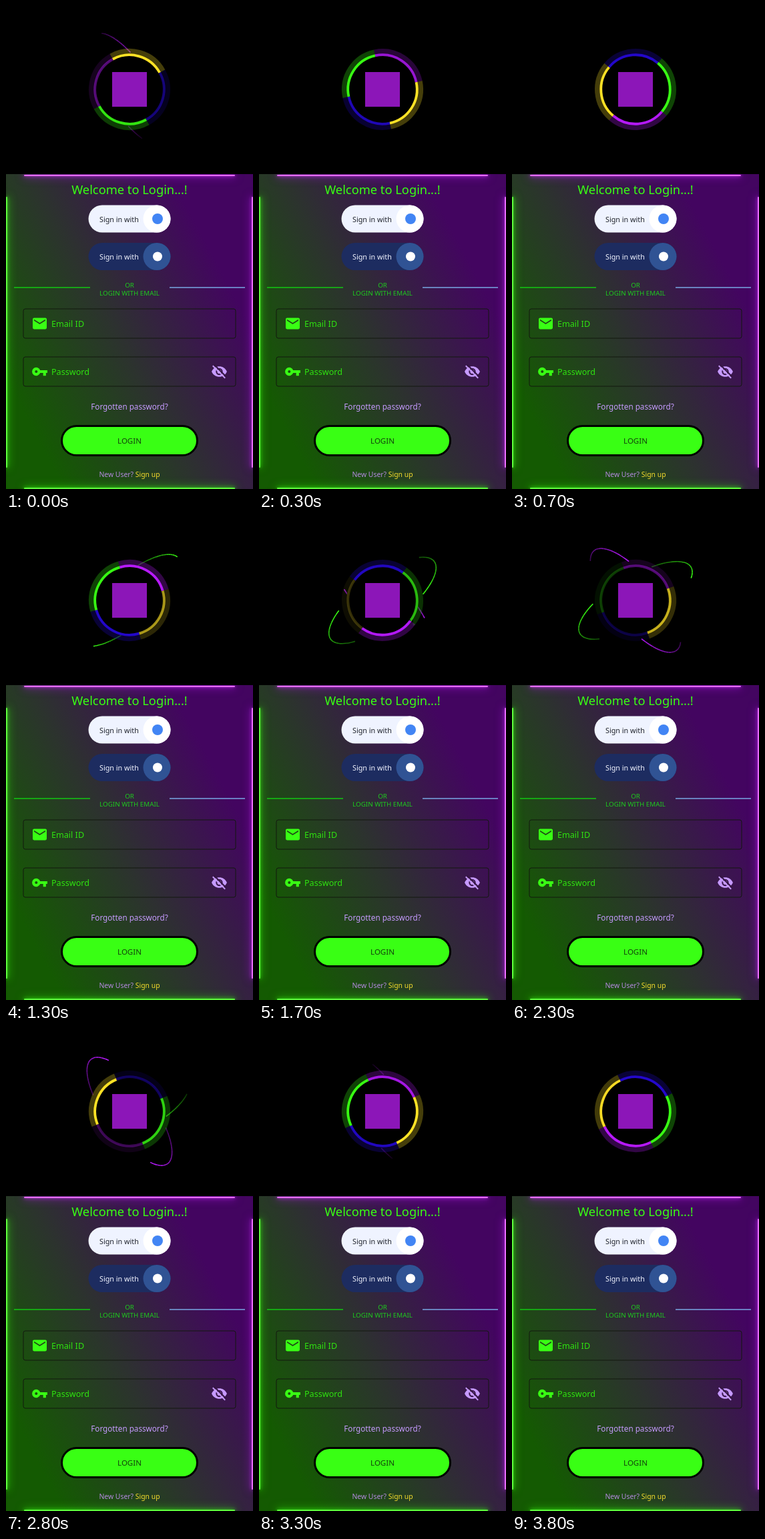
An HTML page with a canvas for the animation above (3.9 s loop, 370 by 724 pixels).

```html
<!DOCTYPE html>
<html lang="en">
<head>
<meta charset="utf-8">
<title>Login</title>
<style>
  html, body { margin: 0; width: 100%; height: 100%; overflow: hidden; background: #000; }
  #stage { position: relative; width: 370px; height: 724px; overflow: hidden; }
  canvas, svg { position: absolute; left: 0; top: 0; }
  .panel {
    position: absolute; left: 0; top: 252px; width: 370px; height: 472px; overflow: hidden;
    background: linear-gradient(62deg, #145a02 14%, #2c332e 46%, #430560 80%);
  }
  .edge { position: absolute; border-radius: 2px; }
  .h { left: 27px; width: 316px; height: 2px; }
  .v { top: 34px; width: 2px; height: 406px; }
  .green { background: #5dff3c; box-shadow: 0 0 5px #39ff14, 0 0 13px 1px #39ff14aa; }
  .pink { background: #e66cff; box-shadow: 0 0 5px #d02cff, 0 0 13px 1px #b81affaa; }
  text { font-family: "Noto Sans", "Open Sans", sans-serif; }
  .mid { text-anchor: middle; }
  .field { fill: none; stroke: #12180f; }
</style>
</head>
<body>
<div id="stage">
  <canvas id="emblem" width="370" height="252"></canvas>
  <div class="panel">
    <div class="edge h pink" style="top:1px"></div>
    <div class="edge h green" style="bottom:0"></div>
    <div class="edge v green" style="left:0"></div>
    <div class="edge v pink" style="right:0"></div>
  </div>
  <svg width="370" height="724" viewBox="0 0 370 724">
    <text class="mid" x="185" y="282" font-size="18.3" fill="#39ff14">Welcome to Login...!</text>

    <rect x="123.5" y="298.5" width="123" height="41" rx="20.5" fill="#eff3ff"/>
    <circle cx="226" cy="319" r="20.5" fill="#fff"/>
    <circle cx="227" cy="319" r="8" fill="#4285f4"/>
    <text x="140" y="324" font-size="10.8" fill="#20242c">Sign in with</text>

    <rect x="123.5" y="355" width="123" height="41" rx="20.5" fill="#1d2c60"/>
    <circle cx="226" cy="375.5" r="20.5" fill="#305394"/>
    <circle cx="227" cy="375.5" r="7" fill="#fff"/>
    <text x="140" y="380" font-size="10.8" fill="#f2f5ff">Sign in with</text>

    <path d="M12 422H126" stroke="#12c812" stroke-width="1.6"/>
    <path d="M245 422H358" stroke="#78a8e4" stroke-width="1.6"/>
    <g class="mid" font-size="9.8" fill="#1ecb1e">
      <text x="185" y="421.5">OR</text>
      <text x="185" y="433.5">LOGIN WITH EMAIL</text>
    </g>

    <rect class="field" x="26" y="454" width="318" height="44" rx="3"/>
    <rect class="field" x="26" y="526" width="318" height="44" rx="3"/>
    <g fill="#39ff14">
      <path transform="translate(37.9 463.4) scale(1.05)"
        d="M20 4H4a2 2 0 0 0-2 2v12a2 2 0 0 0 2 2h16a2 2 0 0 0 2-2V6a2 2 0 0 0-2-2zm0 4l-8 5-8-5V6l8 5 8-5z"/>
      <path transform="translate(38 535.5) scale(1.04)" fill-rule="evenodd"
        d="M12.65 10A6 6 0 1 0 12.65 14H17v4h4v-4h2v-4zM7 14a2 2 0 1 1 0-4 2 2 0 0 1 0 4z"/>
    </g>
    <g font-size="12.6" fill="#2fe310">
      <text x="68" y="481">Email ID</text>
      <text x="68" y="553">Password</text>
    </g>
    <g transform="translate(307 535.5) scale(1.04)">
      <path fill="#c69aff" fill-rule="evenodd"
        d="M1 12C5 2 19 2 23 12C19 22 5 22 1 12zM12 7a5 5 0 1 0 0 10 5 5 0 0 0 0-10z"/>
      <circle cx="12" cy="12" r="3" fill="#c69aff"/>
      <path d="M4.5 2L22 19.5" stroke="#351643" stroke-width="2"/>
      <path d="M2.6 3.6L20.4 21.4" stroke="#c69aff" stroke-width="1.8"/>
    </g>

    <text class="mid" x="185" y="605" font-size="11.7" fill="#c69aff">Forgotten password?</text>
    <rect x="83.5" y="629.5" width="203" height="44" rx="22" fill="#39ff14" stroke="#000" stroke-width="3"/>
    <text class="mid" x="185" y="656.3" font-size="11.5" fill="#12400c">LOGIN</text>
    <text class="mid" x="185" y="705.5" font-size="10.4" fill="#b48ae0">New User? <tspan fill="#f5dc2c">Sign up</tspan></text>
  </svg>
</div>
<script>
const LOOP = 3900, STEP = 100, SWEEP = 900, PULSE = 2900;
const CX = 185, CY = 125, RAD = Math.PI / 180;
const GREEN = '#39ff14', PURPLE = '#b81aff';
const ctx = document.getElementById('emblem').getContext('2d');

// Ring quarters, each with the time at which it is darkest
const quarters = [
  { color: '#ffe326', dip: 1750 },
  { color: '#2408cc', dip: 2500 },
  { color: GREEN, dip: 2200 },
  { color: PURPLE, dip: 2600 }
];

// Two slowly turning orbits; near and far are the sweep starts on either end
const orbits = [
  { color: GREEN, tilt: -54, turn: .01, near: [1120, 2000], far: [1200, 1760] },
  { color: PURPLE, tilt: 33, turn: .0075, near: [-850, 1660, 2440], far: [-775, 1680, 2440] }
];

function brightness(t, dip) {
  const away = (t - dip) - PULSE * Math.round((t - dip) / PULSE);
  return 1 - .8 * Math.exp(-((away / 500) ** 2));
}

// The head eases out while the tail eases in, so the streak stretches and shrinks
function drawSweep(orbit, side, start, t) {
  const p = (t - start) / SWEEP;
  if (p <= 0 || p >= 1) return;
  const angle = q => side - 66 + 128 * q;
  const tail = angle(p ** 3), head = angle(1 - (1 - p) ** 3);
  const tilt = (orbit.tilt + orbit.turn * (start < 0 ? t + 3300 : t)) * RAD;
  const n = 16, d = (head - tail) / n;
  ctx.strokeStyle = orbit.color;
  ctx.lineWidth = 1.6;
  for (let i = 0; i < n; i++) {
    const a = (tail + i * d) * RAD;
    ctx.globalAlpha = (1 - p ** 8) * (.3 + .7 * (i + 1) / n);
    ctx.beginPath();
    ctx.ellipse(CX, CY, 97, 35, tilt, a, a + d * RAD);
    ctx.stroke();
  }
}

function arc(r, width, start, alpha) {
  ctx.globalAlpha = alpha;
  ctx.lineWidth = width;
  ctx.beginPath();
  ctx.arc(CX, CY, r, start, start + Math.PI / 2);
  ctx.stroke();
}

function draw(t) {
  ctx.globalAlpha = 1;
  ctx.fillStyle = '#000';
  ctx.fillRect(0, 0, 370, 252);
  for (const orbit of orbits) {
    for (const start of orbit.near) drawSweep(orbit, 0, start, t);
    for (const start of orbit.far) drawSweep(orbit, 180, start, t);
  }

  // The disc hides the streaks behind the ring
  ctx.globalAlpha = 1;
  ctx.beginPath();
  ctx.arc(CX, CY, 54, 0, 2 * Math.PI);
  ctx.fill();

  const turn = .356 * t - 29;
  quarters.forEach(({ color, dip }, i) => {
    const start = (turn + i * 90 - 90) * RAD, level = brightness(t, dip);
    ctx.strokeStyle = color;
    arc(56.5, 9, start, level * .27);
    arc(51.7, 3.8, start, level);
  });

  ctx.globalAlpha = 1;
  ctx.fillStyle = '#8c16b8';
  ctx.fillRect(CX - 26, CY - 26, 52, 52);
}

const origin = performance.now();
function tick() {
  const t = (performance.now() - origin) % LOOP;
  draw(Math.floor(t / STEP) * STEP);
  requestAnimationFrame(tick);
}
tick();
</script>
</body>
</html>
```
